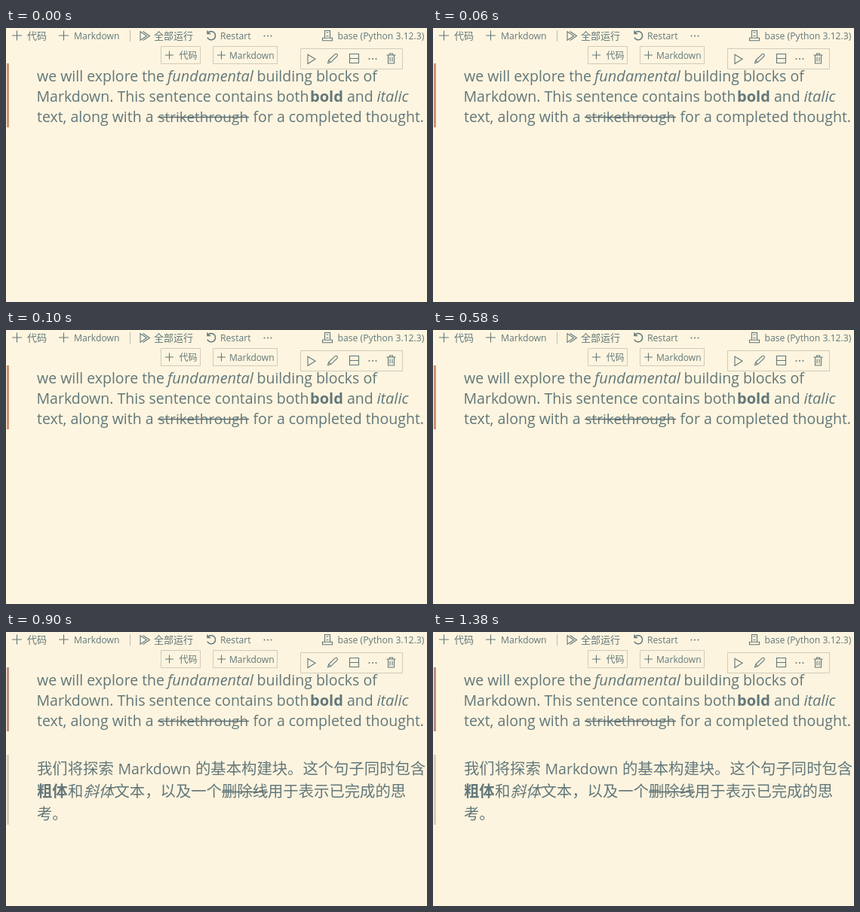
An HTML page that plays this animation: 558x364 px, repeating every 1700 ms.

```html
<!DOCTYPE html>
<html lang="en">
<head>
<meta charset="utf-8">
<title>Notebook translation</title>
<style>
html, body { margin: 0; width: 100%; height: 100%; overflow: hidden; background: #fef5e0; }
svg { display: block; width: 558px; height: 364px; }
text { fill: #62777a; font-family: "Open Sans", "Noto Sans CJK SC", "Noto Sans CJK", sans-serif; white-space: pre; }
.ui { font-size: 12.2px; }
.cjk { font-family: "Noto Sans CJK SC", "Noto Sans CJK", sans-serif; }
.ui.cjk { font-size: 13px; }
.ui.small { font-size: 12px; }
.prose { font-size: 19.5px; }
.prose.cjk { font-size: 20.35px; }
.bold { font-weight: 700; }
.italic { font-style: italic; }
.prose:not(.cjk) .bold, .prose:not(.cjk) .italic { font-size: 20px; }
.icon { fill: none; stroke: #62777a; stroke-width: 1.1; }
.dots { fill: #62777a; }
.frame { fill: none; stroke: #d0cbb9; }
.strike { stroke: #5a6d70; stroke-width: 1.6; }
</style>
</head>
<body>
<svg viewBox="0 0 558 364" lang="zh-CN">
  <g id="toolbar">
    <path class="icon" d="M8 10h13M14.5 3.5v13M70 10h13M76.5 3.5v13"/>
    <text class="ui cjk" x="28" y="15">代码</text>
    <text class="ui" x="90" y="15">Markdown</text>
    <path d="M164.5 3v15" stroke="#bdbbae"/>
    <path class="icon" d="M178 4.7v11.6l8.6-5.8zM181.5 4.5l9 6-9 6"/>
    <text class="ui cjk" x="196" y="15">全部运行</text>
    <path class="icon" style="stroke-width:1.5" d="M267.6 6.6a5.6 5.6 0 1 1-.7 6M267 3.5v4h4.2"/>
    <text class="ui" x="284" y="15">Restart</text>
    <g class="dots"><circle cx="342.5" cy="10.5" r="1"/><circle cx="347" cy="10.5" r="1"/><circle cx="351.5" cy="10.5" r="1"/></g>
    <path class="icon" d="M422.5 13V3.5h7V13M419.5 13.3h13v3.5h-13zM424.5 6h3M424.5 10.5h3"/>
    <text class="ui" x="439.5" y="15">base (Python 3.12.3)</text>
  </g>

  <g id="insert">
    <path class="frame" d="M205.5 24.5h52v23h-52zM274.5 24.5h85v23h-85z"/>
    <path class="icon" d="M211 36h11M216.5 30.5v11M280 36h11M285.5 30.5v11"/>
    <text class="ui cjk small" x="229.5" y="41">代码</text>
    <text class="ui small" x="296" y="41">Markdown</text>
  </g>

  <g id="cell-actions">
    <path class="frame" d="M390.5 27.5h135v27h-135z"/>
    <path class="icon" d="M400 35.3l10 6-10 6.2z"/>
    <path class="icon" d="M426.5 46.8l1.2-4 8.6-8.2q1.4-.9 2.5.2t.2 2.5l-8.5 8.3zM427.7 42.8l2.8 2.8"/>
    <path class="icon" d="M455.5 34.5h12v12h-12zM455.5 40.5h12"/>
    <g class="dots"><circle cx="481.5" cy="41" r="1"/><circle cx="486" cy="41" r="1"/><circle cx="490.5" cy="41" r="1"/></g>
    <path class="icon" d="M504.5 36h12M508.5 36v-2h4v2M506.5 36v11h8v-11M509 38.5v6M512 38.5v6"/>
  </g>

  <g id="english">
    <rect id="active-bar" x="1" y="47" width="3" height="85" fill="#cb9475"/>
    <text class="prose" y="71"><tspan x="41">we will explore the</tspan><tspan class="italic" x="214">fundamental</tspan><tspan x="332.5">building blocks of</tspan></text>
    <text class="prose" y="98"><tspan x="40.5">Markdown. This sentence contains both</tspan><tspan class="bold" x="403">bold</tspan><tspan x="452">and</tspan><tspan class="italic" x="491.5">italic</tspan></text>
    <text class="prose" y="125"><tspan x="41">text, along with a</tspan><tspan x="201.5" font-size="19">strikethrough</tspan><tspan x="327.5">for a completed thought.</tspan></text>
    <path class="strike" d="M201 118.5h121"/>
  </g>

  <g id="chinese" opacity="0">
    <rect x="1" y="163" width="3" height="93" fill="#d7cebb"/>
    <text class="prose cjk" x="41" y="188.5">我们将探索</text>
    <text class="prose" x="148.5" y="188.5">Markdown</text>
    <text class="prose cjk" x="251" y="188.5">的基本构建块。这个句子同时包含</text>
    <text class="prose cjk" y="219"><tspan class="bold" x="41">粗体</tspan><tspan x="82">和</tspan><tspan class="italic" x="102.5">斜体</tspan><tspan x="143.5">文本，以及一个</tspan><tspan x="286">删除线</tspan><tspan x="347">用于表示已完成的思</tspan></text>
    <path class="strike" d="M286 212.5h61"/>
    <text class="prose cjk" x="41" y="249">考。</text>
  </g>
</svg>
<script>
const LOOP = 1700;
const steps = [
  { at: 0, page: "#fef5e0", bar: "#cb9475", chinese: 0 },
  { at: 100, page: "#fdf5df", bar: "#d09074", chinese: 0 },
  { at: 900, page: "#fdf4df", bar: "#ba8e85", chinese: 1 }
];
const page = document.body;
const bar = document.getElementById("active-bar");
const chinese = document.getElementById("chinese");

function draw(now) {
  const time = now % LOOP;
  const step = steps.filter(s => s.at <= time).pop();
  page.style.backgroundColor = step.page;
  bar.setAttribute("fill", step.bar);
  chinese.setAttribute("opacity", step.chinese);
}

const start = performance.now();
function tick() {
  draw(performance.now() - start);
  requestAnimationFrame(tick);
}
tick();
</script>
</body>
</html>
```
